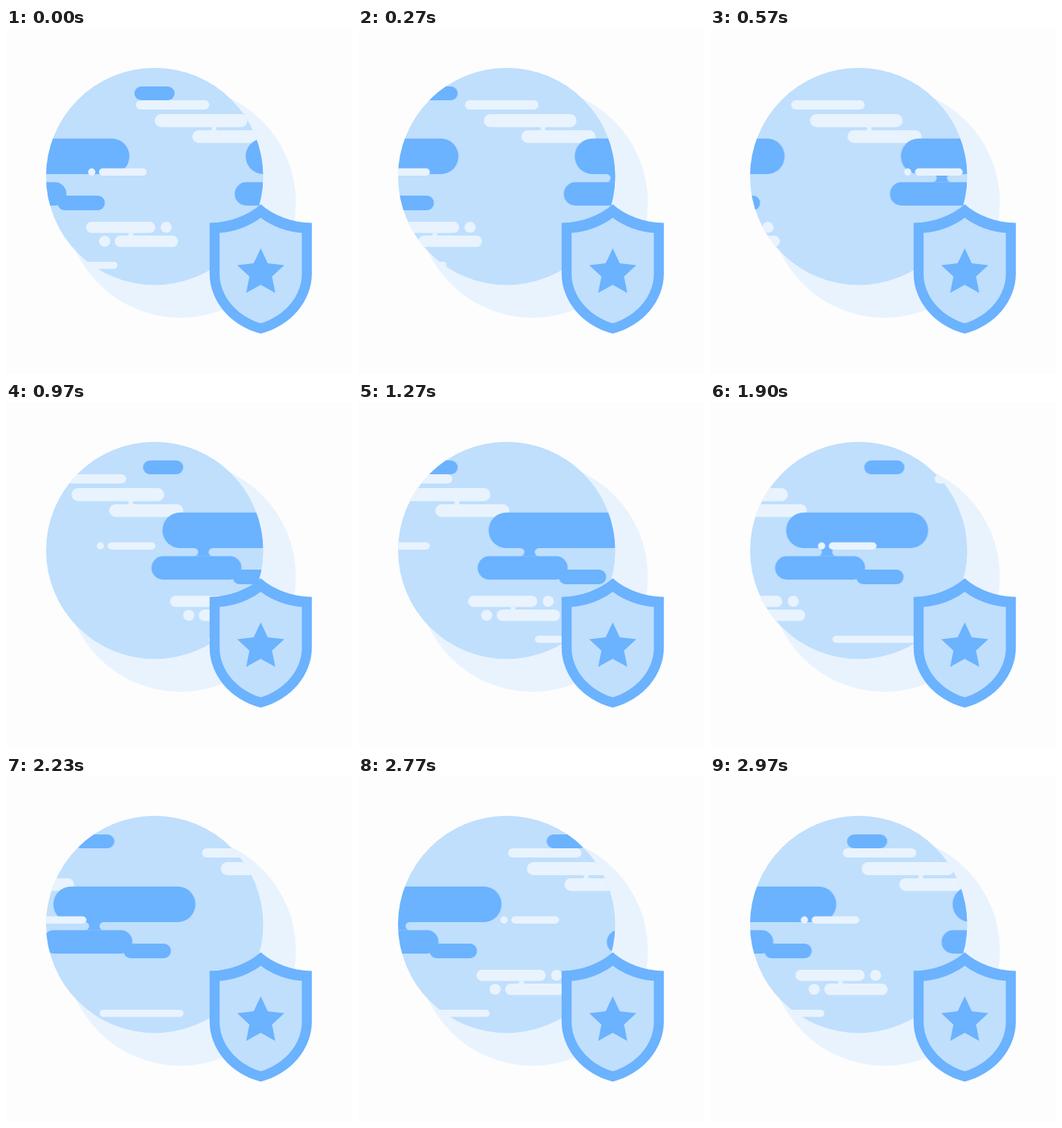
Recreate the animation shown at these times as an HTML page. Size 450x450 px, loop 3010 ms.

```html
<!DOCTYPE html>
<html lang="en">
<head>
<meta charset="utf-8">
<title>Planet and shield</title>
<style>
  html, body { margin: 0; width: 100%; height: 100%; overflow: hidden; background: #fdfdfe; }
  svg { display: block; width: 100%; height: 100%; }
  .deep { fill: #6bb2ff; }
  .sky { fill: #bfdffd; }
  .pale { fill: #e9f3fe; }

  /* 90 poses per loop; the last one is held until the loop ends */
  .layer { animation: 3010ms steps(89) -4ms infinite; }
  #slow { animation-name: slow; }
  #mid { animation-name: mid; }
  #fast { animation-name: fast; }
  @keyframes slow {
    98.56%, 100% { transform: translateX(-332.27px); }
  }
  @keyframes fast {
    98.56%, 100% { transform: translateX(-996.8px); }
  }
  @keyframes mid {
    0% { transform: translateX(0); animation-timing-function: steps(43); }
    47.62% { transform: translateX(-336px); animation-timing-function: steps(46); }
    98.56%, 100% { transform: translateX(-664.85px); }
  }
</style>
</head>
<body>
<svg viewBox="0 0 450 450">
  <clipPath id="disc"><circle cx="193.3" cy="193" r="141.2"/></clipPath>

  <circle class="pale" cx="227" cy="227" r="150"/>
  <circle class="sky" cx="193.3" cy="193" r="141.2"/>

  <g clip-path="url(#disc)">
    <g id="slow" class="layer">
      <g class="tile">
        <g class="pale">
          <rect x="169" y="94" width="95.5" height="12" rx="6"/>
          <rect x="193.5" y="112" width="120.5" height="17" rx="8.5"/>
          <path d="M266 129a2 2 0 0 1 0 4h9a2 2 0 0 1 0-4z"/>
          <rect x="242.3" y="133" width="96.4" height="16.5" rx="8.25"/>
          <rect x="36" y="304" width="109" height="9.3" rx="4.65"/>
        </g>
        <g class="deep">
          <rect x="-24.3" y="143.8" width="184.8" height="46.2" rx="23"/>
          <path d="M17 190a5.3 5.3 0 0 1 0 10.6h24a5.3 5.3 0 0 1 0-10.6z"/>
          <rect x="-38.5" y="200.6" width="117" height="30.4" rx="15"/>
          <rect x="67" y="218" width="61.5" height="19" rx="9"/>
        </g>
      </g>
    </g>
    <g id="mid" class="layer">
      <g class="tile pale">
        <rect x="104" y="252" width="90" height="14.5" rx="7.25"/>
        <circle cx="208.3" cy="259.2" r="7.2"/>
        <path d="M158 266.5a1.75 1.75 0 0 1 0 3.5h9a1.75 1.75 0 0 1 0-3.5z"/>
        <circle cx="128.3" cy="277.4" r="7.2"/>
        <rect x="141.3" y="270" width="82.5" height="14.8" rx="7.4"/>
      </g>
    </g>
    <g id="fast" class="layer">
      <g class="tile">
        <rect class="deep" x="167" y="76" width="52.3" height="18" rx="9"/>
        <g class="pale">
          <circle cx="111.5" cy="187.3" r="4.7"/>
          <rect x="121" y="182.6" width="62" height="9.4" rx="4.7"/>
        </g>
      </g>
    </g>
  </g>

  <g transform="translate(331.3 318.4)">
    <path class="deep" d="M0-89.2C17.5-74 41.5-65 66.5-65V1C66.5 36 39.5 69 0 79C-39.5 69-66.5 36-66.5 1V-65C-41.5-65-17.5-74 0-89.2z"/>
    <path class="sky" d="M0-71.7C15.5-60 34.5-53.5 53.5-52V1C53.5 30 31.5 56 0 65.7C-31.5 56-53.5 30-53.5 1V-52C-34.5-53.5-15.5-60 0-71.7z"/>
    <polygon class="deep"
      points="0,-32 9.1,-12.5 30.6,-9.9 14.7,4.8 18.9,26 0,15.5 -18.9,26 -14.7,4.8 -30.6,-9.9 -9.1,-12.5"/>
  </g>
</svg>
<script>
  // Repeat each cloud set along its layer so the drift never runs out.
  const period = 336;
  for (const tile of document.querySelectorAll('.tile')) {
    const layer = tile.parentNode;
    for (let i = 1; i < 5; i++) {
      const copy = tile.cloneNode(true);
      copy.setAttribute('transform', `translate(${i * period} 0)`);
      layer.append(copy);
    }
  }
</script>
</body>
</html>
```
